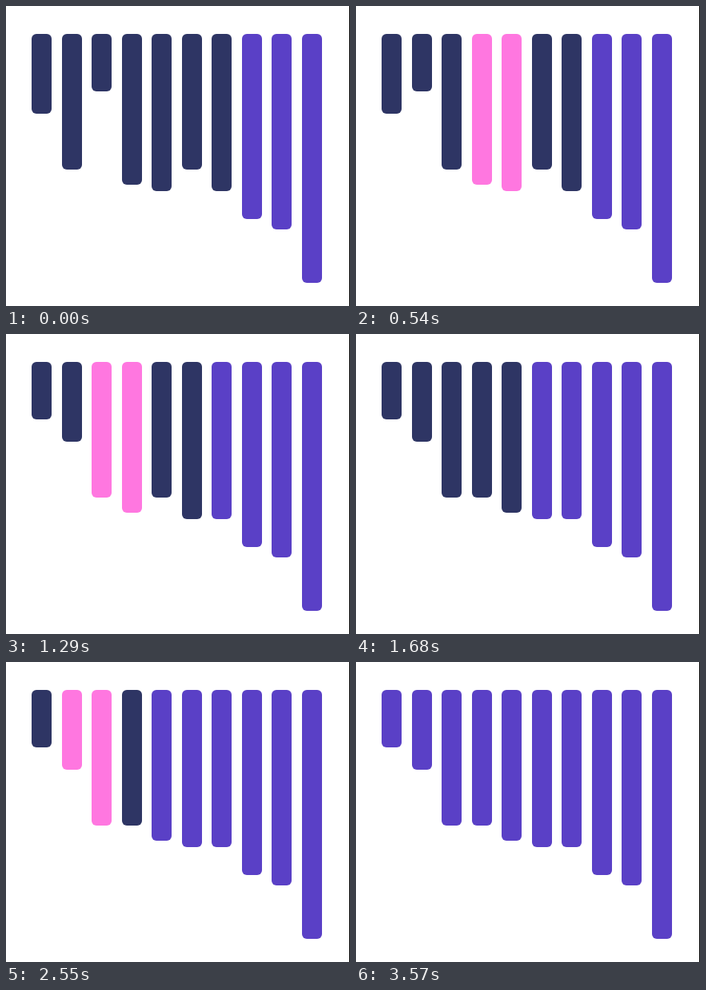
Write an HTML page that moves like this. It is 430 by 376 pixels and loops after 4740 ms.

```html
<!DOCTYPE html>
<html lang="en">
<head>
<meta charset="utf-8">
<title>Bubble sort</title>
<style>
  html, body { margin: 0; width: 100%; height: 100%; overflow: hidden; background: #fff; }
  svg { display: block; width: 430px; height: 376px; }
</style>
</head>
<body>
<svg id="stage" viewBox="0 0 430 376" xmlns="http://www.w3.org/2000/svg">
  <rect width="430" height="376" fill="#fff"/>
  <rect x="429" width="1" height="376" fill="#000"/>
</svg>
<script>
const LOOP = 4740;
const SWAP = 150;
const IDLE = '#2e3564', ACTIVE = '#ff77e0', DONE = '#5a40c6';
const START = [100, 170, 72, 189, 197, 170, 197, 232, 245, 312];

// One tick per comparison, plus one at the end of each pass.
const TICKS = [
  120, 300, 420, 540, 660, 780, 900,
  1050, 1170, 1290, 1410, 1530, 1680,
  1800, 1920, 2040, 2190, 2310,
  2430, 2550, 2670, 2820,
  2940, 3060, 3180,
  3330, 3450, 3570
];

function buildSteps() {
  const heights = START.slice();
  const steps = [{ at: 0, active: -1, sorted: 7, from: START, to: START }];
  let tick = 0;
  const add = (active, sorted, from) =>
    steps.push({ at: TICKS[tick++], active, sorted, from, to: heights.slice() });

  for (let n = 7; n > 1; n--) {
    for (let i = 0; i < n - 1; i++) {
      const from = heights.slice();
      if (heights[i] > heights[i + 1]) {
        [heights[i], heights[i + 1]] = [heights[i + 1], heights[i]];
      }
      add(i, n, from);
    }
    add(-1, n - 1, heights.slice());
  }
  add(-1, 0, heights.slice());
  return steps;
}

// CSS "ease": cubic-bezier(.25, .1, .25, 1)
function ease(p) {
  if (p <= 0) return 0;
  if (p >= 1) return 1;
  const curve = (u, a, b) => 3 * (1 - u) * (1 - u) * u * a + 3 * (1 - u) * u * u * b + u * u * u;
  let lo = 0, hi = 1;
  for (let k = 0; k < 20; k++) {
    const mid = (lo + hi) / 2;
    if (curve(mid, .25, .25) < p) lo = mid; else hi = mid;
  }
  return curve(lo, .1, 1);
}

const steps = buildSteps();
const stage = document.getElementById('stage');
const bars = START.map((h, i) => {
  const bar = document.createElementNS('http://www.w3.org/2000/svg', 'rect');
  const attrs = { x: Math.round(32 + i * 37.5), y: 35, width: 25, height: h, rx: 6 };
  for (const name in attrs) bar.setAttribute(name, attrs[name]);
  stage.appendChild(bar);
  return bar;
});

function heightAt(i, t) {
  let h = START[i];
  for (const s of steps) {
    if (s.at > t) break;
    if (s.from[i] !== s.to[i]) h += (s.to[i] - h) * ease((t - s.at) / SWAP);
  }
  return Math.round(h);
}

function draw(t) {
  const now = steps.filter(s => s.at <= t).pop();
  bars.forEach((bar, i) => {
    const active = now.active >= 0 && (i === now.active || i === now.active + 1);
    bar.setAttribute('height', heightAt(i, t));
    bar.setAttribute('fill', active ? ACTIVE : i >= now.sorted ? DONE : IDLE);
  });
}

const began = performance.now();
function frame() {
  draw((performance.now() - began) % LOOP);
  requestAnimationFrame(frame);
}
frame();
</script>
</body>
</html>
```
